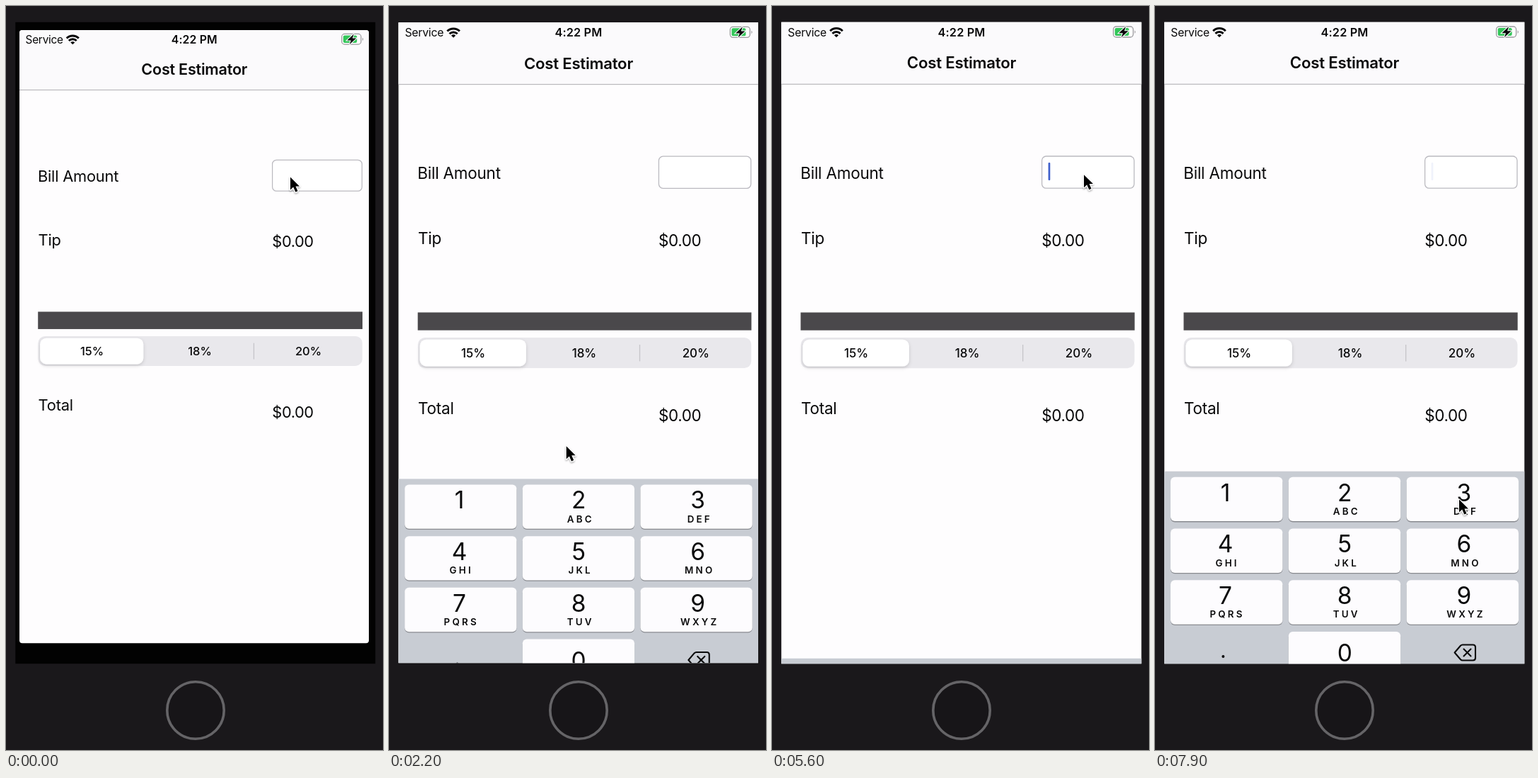
An HTML page for the animation above (8 s loop, 533 by 1050 pixels).

```html
<!DOCTYPE html>
<html lang="en">
<head>
<meta charset="utf-8">
<title>Cost Estimator</title>
<style>
  html, body { margin: 0; width: 100%; height: 100%; overflow: hidden; background: #1a181b; }
  svg { display: block; width: 100vw; height: 100vh; }
  text { font-family: Inter, Roboto, sans-serif; fill: #09090a; }
  .body { font-size: 22.5px; letter-spacing: -.01em; }
  .money { letter-spacing: -.02em; }
  .mid { text-anchor: middle; }
  .status { font-size: 15.8px; letter-spacing: -.015em; }
  .time { font-size: 16.3px; font-weight: 600; letter-spacing: .008em; }
  .title { font-size: 22.2px; font-weight: 600; letter-spacing: -.01em; }
  .bold { font-weight: 600; }
  .segment { font-size: 17px; font-weight: 500; }
  .digit { font-size: 33.5px; }
  .letters { font-size: 13.4px; font-weight: 600; letter-spacing: 3.2px; }
</style>
</head>
<body>
<svg viewBox="0 0 533 1050" preserveAspectRatio="none">
  <defs>
    <clipPath id="clip"><rect id="window"/></clipPath>
    <filter id="soft" x="-20%" y="-30%" width="140%" height="170%">
      <feDropShadow dx="0" dy="2" stdDeviation="2.5" flood-opacity=".16"/>
    </filter>
    <filter id="pointerShadow" x="-50%" y="-50%" width="200%" height="200%">
      <feDropShadow dx="0" dy="1.5" stdDeviation="1.2" flood-opacity=".35"/>
    </filter>
  </defs>

  <rect width="533" height="1050" fill="#1a181b"/>
  <rect x="13.3" y="22.8" width="508.9" height="905.4" fill="#020202"/>
  <circle cx="268" cy="994" r="40.2" fill="#171518" stroke="#656467" stroke-width="3.6"/>

  <g clip-path="url(#clip)">
    <g id="content">
      <rect y="0" width="533" height="960" fill="#fefdfe"/>
      <rect y="0" width="533" height="110" fill="#fbfafc"/>
      <rect y="109.8" width="533" height="1.1" fill="#b4b3b7"/>

      <text class="status" x="22.3" y="43">Service</text>
      <g fill="none" stroke="#09090a" stroke-width="3">
        <path d="M82.2 35.2A12.5 12.5 0 0 1 99.8 35.2M85.4 38.9A7.9 7.9 0 0 1 96.6 38.9"/>
        <path d="M91 44.3L87.9 41.3A4.4 4.4 0 0 1 94.1 41.3Z" fill="#09090a" stroke="none"/>
      </g>
      <text class="time mid" x="268" y="43">4:22 PM</text>
      <g>
        <rect x="482.6" y="29" width="28" height="15" rx="4" fill="#fff" stroke="#9b9a9e" stroke-width="1.3"/>
        <rect x="484.7" y="31" width="20" height="11" rx="2.2" fill="#33c659"/>
        <path d="M512.6 34.2Q515.2 36.6 512.6 39Z" fill="#9b9a9e"/>
        <path d="M500.2 29L490.3 38.2H496L493.8 44.2L503.8 35.2H498.1Z" fill="#09090a" stroke="#fff" stroke-width="2" paint-order="stroke"/>
      </g>
      <text class="title mid" x="268" y="88.3">Cost Estimator</text>

      <text class="body" x="40.2" y="244">Bill Amount</text>
      <rect x="381.6" y="212" width="130.4" height="45.2" rx="6" fill="#fff" stroke="#bbbac0" stroke-width="1.3"/>
      <rect id="caret" x="390.6" y="221" width="2.7" height="25" rx="1" fill="#3f60cc"/>
      <text class="body" x="40.9" y="336.2">Tip</text>
      <text class="body money" x="381.3" y="338.7">$0.00</text>
      <rect x="40.5" y="432.5" width="472.2" height="25.2" fill="#4a484b"/>

      <rect x="40.8" y="468" width="471.7" height="43.2" rx="10" fill="#e9e8ec"/>
      <rect x="43.5" y="470.8" width="150.4" height="37.8" rx="9" fill="#fff" filter="url(#soft)"/>
      <rect x="354" y="478" width="1.3" height="23.5" fill="#c5c4c9"/>
      <text class="segment bold mid" x="119" y="496">15%</text>
      <text class="segment mid" x="276" y="496">18%</text>
      <text class="segment mid" x="434" y="496">20%</text>

      <text class="body" x="40.9" y="576">Total</text>
      <text class="body money" x="381.3" y="586.4">$0.00</text>

      <g id="keyboard">
        <rect width="533" height="320" fill="#c8ccd3"/>
        <g id="keys"></g>
        <circle cx="96.4" cy="261.3" r="2" fill="#09090a"/>
        <path d="M423.6 255.8L432 246Q433.2 244.8 434.8 244.8H449.5Q453 244.8 453 248.3V263.3Q453 266.8 449.5 266.8H434.8Q433.2 266.8 432 265.6ZM436.5 250.8l10 10m0-10l-10 10"
          fill="none" stroke="#09090a" stroke-width="2.1" stroke-linejoin="round" stroke-linecap="round"/>
      </g>
    </g>
  </g>

  <g id="pointer">
    <path d="M1 1.5V19.5L5.2 15.6L8.3 22.6L11.5 21.2L8.5 14.4H14Z" fill="#050505"
      stroke="#fff" stroke-width="2.4" stroke-linejoin="round" paint-order="stroke" filter="url(#pointerShadow)"/>
  </g>
</svg>
<script>
const LOOP = 8000, STEP = 100;
const KEYBOARD_HEIGHT = 293, SCREEN_BOTTOM = 928;
const $ = id => document.getElementById(id);
const mix = (a, b, p) => a + (b - a) * p;

const letters = ['', 'ABC', 'DEF', 'GHI', 'JKL', 'MNO', 'PQRS', 'TUV', 'WXYZ'];
function key(digit, label, col, row) {
  const x = 22 + col * 166.8, y = 8 + row * 72.8, center = 99.5 + col * 168.7;
  const baseline = y + (digit ? 34 : 42);
  const cap = (top, fill) =>
    `<rect x="${x}" y="${top}" width="158.4" height="62.4" rx="6" fill="${fill}"/>`;
  return cap(y + 1.3, '#898b90') + cap(y, '#fdfcfe') +
    `<text class="digit mid" x="${center}" y="${baseline}">${digit}</text>` +
    `<text class="letters mid" x="${center + 2.6}" y="${y + 53.2}">${label}</text>`;
}
$('keys').innerHTML =
  letters.map((label, i) => key(i + 1, label, i % 3, Math.floor(i / 3))).join('') + key(0, '', 1, 3);

// Critically damped spring, slowed ten times.
function spring(ms) {
  const x = Math.max(0, ms) * 0.001826;
  return 1 - (1 + x) * Math.exp(-x);
}

// Interpolates rows of [time, ...values].
function track(rows, t, ease = p => p) {
  const i = rows.findIndex(row => row[0] > t);
  if (i < 0) return rows[rows.length - 1].slice(1);
  if (i === 0) return rows[0].slice(1);
  const [a, b] = [rows[i - 1], rows[i]];
  const p = ease((t - a[0]) / (b[0] - a[0]));
  return a.slice(1).map((v, k) => mix(v, b[k + 1], p));
}
const smooth = p => p * p * (3 - 2 * p);

const pointerPath = [
  [0, 401, 240], [1500, 401, 240], [2100, 250, 620], [2500, 248, 619], [4500, 248, 619],
  [5400, 440, 237], [5900, 440, 236], [7100, 385, 663], [7900, 429, 695]
];
const caretFade = [
  [0, 0], [149, 0], [150, 1], [700, 1], [1400, .08], [1500, 0],
  [5549, 0], [5550, 1], [7200, 1], [7900, .08]
];

function draw(t) {
  const zoom = 1 - Math.exp(-t / 650);
  const left = mix(19, 13.2, zoom), right = mix(513, 522.3, zoom);
  const top = mix(34, 22.8, zoom), bottom = mix(899.3, SCREEN_BOTTOM + .2, zoom);
  const box = { x: left, y: top, width: right - left, height: bottom - top, rx: 4 * (1 - zoom) };
  for (const name in box) $('window').setAttribute(name, box[name]);
  $('content').setAttribute('transform',
    `translate(${mix(5.88, 0, zoom)} ${mix(11.3, 0, zoom)}) scale(${mix(.9715, 1, zoom)})`);

  const shown = spring(t - 145) - spring(t - 2517) + spring(t - 5570);
  $('keyboard').setAttribute('transform', `translate(0 ${SCREEN_BOTTOM - KEYBOARD_HEIGHT * shown})`);
  $('caret').setAttribute('opacity', track(caretFade, t)[0]);
  $('pointer').setAttribute('transform', `translate(${track(pointerPath, t, smooth).join(' ')})`);
}

const start = performance.now();
function tick() {
  const t = (performance.now() - start) % LOOP;
  draw(Math.floor(t / STEP) * STEP);
  requestAnimationFrame(tick);
}
tick();
</script>
</body>
</html>
```
